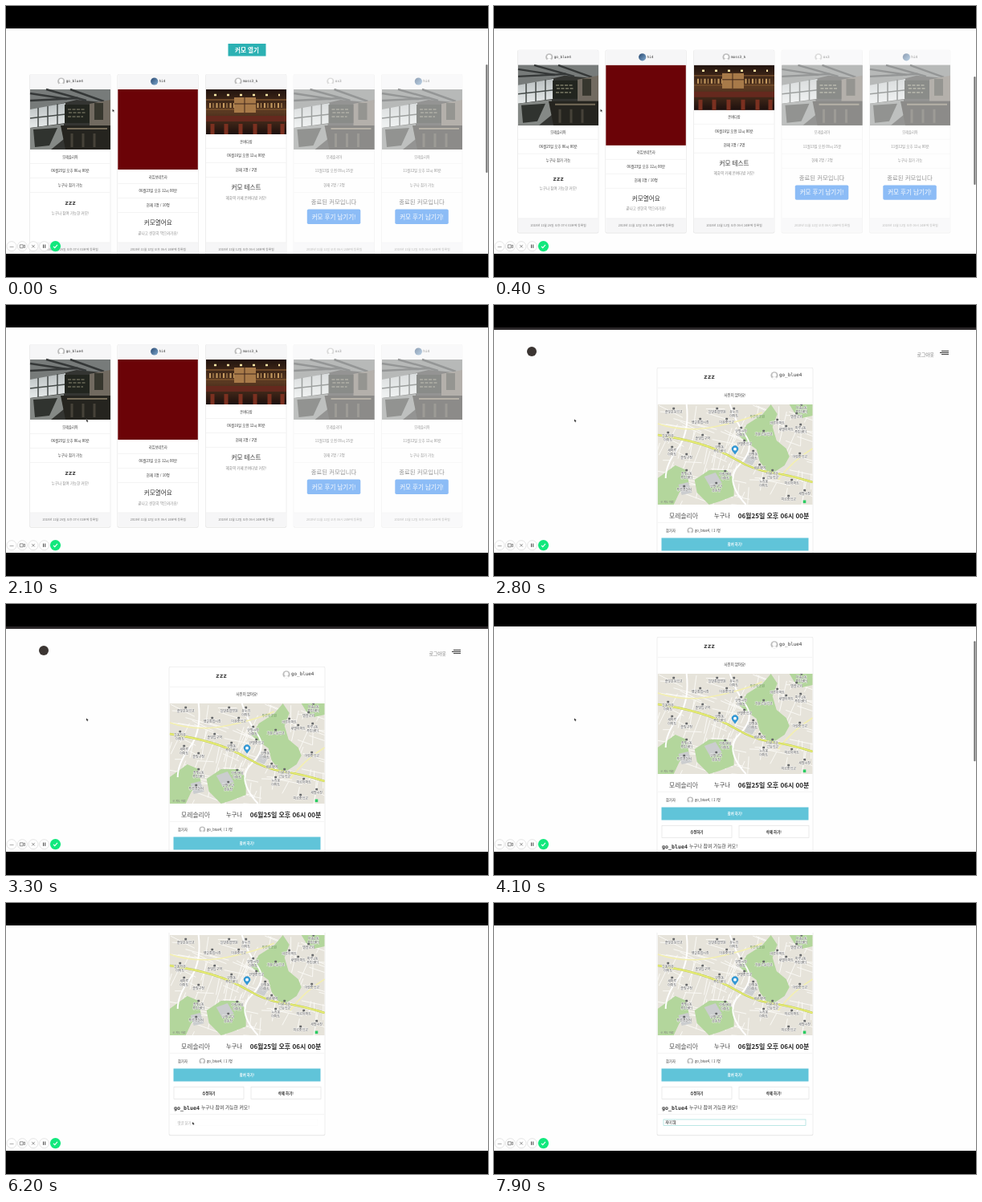
Write an HTML page that moves like this. It is 600 by 338 pixels and loops after 8 s.

```html
<!DOCTYPE html>
<html lang="ko">
<head>
<meta charset="utf-8">
<title>커모</title>
<style>
html, body { margin: 0; width: 100%; height: 100%; overflow: hidden; background: #000; }
svg { display: block; width: 100vw; height: 100vh; }
text { font-family: "Noto Sans CJK KR", "Noto Sans CJK", "Noto Sans", sans-serif; white-space: pre; }
.mono { font-family: "DejaVu Sans Mono", "Noto Sans CJK KR", monospace; }
</style>
</head>
<body>
<svg id="stage" viewBox="0 0 600 338">
  <defs>
    <clipPath id="view"><rect y="37" width="600" height="272"/></clipPath>
    <clipPath id="mapBox"><rect width="193" height="125"/></clipPath>
    <clipPath id="disc"><circle r="4.6"/></clipPath>
    <linearGradient id="glow" x2="0" y2="1">
      <stop offset="0" stop-color="#b9bfc0"/><stop offset="1" stop-color="#e6eaea"/>
    </linearGradient>
    <linearGradient id="sky" x2="1" y2="1">
      <stop offset="0" stop-color="#27476f"/><stop offset="1" stop-color="#7fa9cf"/>
    </linearGradient>
    <linearGradient id="bar" x2="0" y2="1">
      <stop offset="0" stop-color="#21130e"/><stop offset=".5" stop-color="#5b3a22"/><stop offset="1" stop-color="#1d0f0d"/>
    </linearGradient>
    <g id="person">
      <circle r="4.6" fill="#bdbdbd"/>
      <g clip-path="url(#disc)" fill="#fff"><circle cy="-.6" r="2.6"/><ellipse cy="5" rx="3.8" ry="2.8"/></g>
    </g>
    <circle id="photo" r="4.6" fill="url(#sky)"/>
    <g id="cafe">
      <rect width="100" height="75" fill="#343532"/>
      <path d="M0 0H100V17L58 13L0 27Z" fill="#777b7a"/>
      <path d="M0 5L46 12M0 14L60 11M20 0L70 14M50 0L92 15" stroke="#353838" stroke-width="2.4"/>
      <path d="M0 25L44 17V42L0 48Z" fill="url(#glow)"/>
      <path d="M10 23V48M22 21V46M34 18V45M0 36L44 31" stroke="#454b49" stroke-width="1.5"/>
      <path d="M74 18L100 13V45H74Z" fill="#716a60"/>
      <rect x="43" y="19" width="31" height="23" fill="#22251f"/>
      <path d="M47 25H68M48 29H70M47 34H66" stroke="#8b8a74" stroke-width="1.2" stroke-dasharray="4 1.5"/>
      <rect x="80" y="17" width="11" height="21" fill="#37372e"/>
      <path d="M0 48L42 43V62L26 75H0Z" fill="#858986"/>
      <path d="M4 50L34 48L24 70L6 72Z" fill="#30332f"/>
      <path d="M38 45H100V75H44Z" fill="#25241f"/>
      <path d="M46 49H96" stroke="#766c59" stroke-width="2"/>
      <path d="M52 55V72M66 55V72M80 55V72" stroke="#464239" stroke-width="3"/>
    </g>
    <g id="pub">
      <rect width="100" height="56" fill="url(#bar)"/>
      <path d="M0 13H100M0 25H100" stroke="#7d542e" stroke-width="1.4"/>
      <path d="M4 20H96" stroke="#c69b60" stroke-width="6" stroke-dasharray="2 2.5 1 3"/>
      <path d="M10 7H92" stroke="#ffe6a5" stroke-width="2.5" stroke-dasharray="3 13"/>
      <path d="M35 10H62V29H35Z" fill="#a87a49"/>
      <path d="M48 10V29M35 18H62" stroke="#40271a"/>
      <path d="M0 33H100V40H0Z" fill="#65291e"/>
      <path d="M8 43V56M25 43V56M43 43V56M61 43V56M79 43V56M95 43V56" stroke="#7b3020" stroke-width="5"/>
    </g>
  </defs>
  <rect y="28" width="600" height="281" fill="#fefefe"/>
  <g clip-path="url(#view)"><g id="list"></g><g id="detail"></g></g>
  <rect id="edge" y="28" width="600" height="3" fill="#2b2729"/>
  <rect id="thumb" x="597.3" width="2.2" rx="1.1" fill="#757575"/>
  <g id="tools"></g>
  <path id="cursor" d="M0 0V3.6L.9 2.8L1.6 4.1L2.2 3.8L1.6 2.6H2.7Z" fill="#111" stroke="#fff" stroke-width=".25"/>
</svg>
<script>
const $ = id => document.getElementById(id);

function add(parent, tag, attrs = {}) {
  const node = document.createElementNS('http://www.w3.org/2000/svg', tag);
  for (const key in attrs) node.setAttribute(key, attrs[key]);
  return parent.appendChild(node);
}
const rect = (p, x, y, width, height, fill, more) => add(p, 'rect', { x, y, width, height, fill, ...more });
const use = (p, id, x, y, k = 1) => add(p, 'use', { href: '#' + id, transform: `translate(${x} ${y}) scale(${k})` });
const path = (p, d, stroke, width, more) =>
  add(p, 'path', { d, fill: 'none', stroke, 'stroke-width': width, ...more });
const rule = (p, x, y, w) => path(p, `M${x} ${y}h${w}`, '#ececec', .6);

// y is the middle of the line
function label(p, str, x, y, size, more = {}) {
  const node = add(p, 'text', {
    x, y: y + size * .36, 'font-size': size, fill: '#333', 'text-anchor': 'middle', ...more
  });
  node.textContent = str;
  return node;
}
const left = { 'text-anchor': 'start' };
const bold = { 'font-weight': 700 };
const mono = { class: 'mono' };

function panel(p, x, y, w, h) {
  rect(p, x - .8, y, w + 1.6, h + 1.2, '#e4e4e4', { rx: 2 });
  rect(p, x - .2, y + .4, w + .4, h - .2, '#fff', { rx: 1.6 });
}

const USER = 'go_blue4', CAFE = '모레솔리아';
const cards = [
  { x: 30, user: USER, face: 'person', pic: 'cafe', h: 75, cafe: CAFE, date: '06월25일 오후 06시 00분',
    who: '누구나 참가 가능', title: 'zzz', note: '누구나 참여 가능한 커모!', made: '2018년 11월 26일 오후 07시 01분에 등록됨' },
  { x: 139.3, user: 'hi4', face: 'photo', h: 100, cafe: '라임보네트라', date: '06월23일 오후 12시 00분',
    who: '현재 1명 / 10명', title: '커모열어요', note: '끝나고 션한히 먹으러가요!', made: '2018년 11월 12일 오후 06시 24분에 등록됨' },
  { x: 249, user: 'moss3_k', face: 'person', pic: 'pub', h: 56, cafe: '온벼다방', date: '06월16일 오전 12시 00분',
    who: '현재 1명 / 2명', title: '커모 테스트', note: '혜화역 카페 온벼다방 커모!', made: '2018년 11월 12일 오후 06시 24분에 등록됨' },
  { x: 358.5, user: 'ox3', face: 'person', pic: 'cafe', h: 75, cafe: CAFE, date: '11월13일 오전 09시 25분',
    who: '현재 2명 / 2명', closed: true, made: '2018년 11월 12일 오후 06시 24분에 등록됨' },
  { x: 468, user: 'hi4', face: 'photo', pic: 'cafe', h: 75, cafe: CAFE, date: '11월12일 오후 12시 00분',
    who: '누구나 참가 가능', closed: true, made: '2018년 11월 12일 오후 06시 24분에 등록됨' }
];

function drawCard(p, c) {
  const g = add(p, 'g', { opacity: c.closed ? .52 : 1 });
  const mid = c.x + 50, base = 104 + c.h;
  panel(g, c.x, 85, 99.5, 227.5);
  rect(g, c.x, 85.5, 99.5, 18.5, '#f6f6f7');
  rect(g, c.x, 295, 99.5, 17, '#f6f6f7');
  const half = (c.user.length * 2.65 + 10.5) / 2;
  use(g, c.face, mid - half + 4.6, 94);
  label(g, c.user, mid - half + 10.5, 93.8, 4.4, { ...left, ...mono });
  if (c.pic) use(g, c.pic, c.x, 104);
  else rect(g, c.x, 104, 99.5, c.h, '#6b0307');
  label(g, c.cafe, mid, base + 9, 4.2);
  label(g, c.date, mid, base + 26.5, 4.4);
  label(g, c.who, mid, base + 44, 4.4);
  for (const dy of [17.5, 35.5, 53.5]) rule(g, c.x, base + dy, 99.5);
  if (c.closed) {
    label(g, '종료된 커모입니다', mid - .5, 244.3, 7.4);
    rect(g, c.x + 16.3, 253.6, 66.5, 18.4, '#2580ef', { rx: 1.8 });
    label(g, '커모 후기 남기기!', mid - .4, 262.8, 7.5, { fill: '#fff', 'font-weight': 500 });
  } else {
    const z = c.title === 'zzz';
    label(g, c.title, mid, base + 66, 7.6, z ? { ...mono, ...bold } : { 'font-weight': 500 });
    label(g, c.note, mid, base + 79, 4.5, { fill: '#888' });
  }
  rule(g, c.x, 295, 99.5);
  label(g, c.made, mid, 304, 3.75, { fill: '#777' });
}

function drawList(p) {
  rect(p, 276.5, 47, 47, 15.5, '#2cb1b3');
  label(p, '커모 열기', 300, 54.8, 7.6, { fill: '#fff', ...bold });
  for (const c of cards) drawCard(p, c);
}

const places = [
  [20, 10, '솔빛초등학교'], [13, 40, '늘봄타운|아파트'], [18, 58, '새마루|아파트'], [36, 67, '솔빛구청'],
  [74, 10, '늘벗종합병원'], [53, 23, '햇살종합시장'], [86, 23, '다온중학교'], [95, 10, '온누리|아파트'],
  [149, 24, '바른아파트'], [179, 5, '다솜1동|주민센터'], [173, 16, '별솔교회'], [56, 43, '솔빛입구역'],
  [108, 50, '한별중학교'], [104, 34, '한별시장|아파트'], [77, 54, '한별동|주민센터'], [132, 38, '가온고등학교'],
  [160, 32, '새별아파트'], [178, 30, '마루2동|주민센터'], [177, 66, '아람중학교'], [119, 63, '한별동|아파트'],
  [127, 80, '새온대역'], [143, 87, '다온기술|고등학교'], [167, 99, '미르아파트'], [132, 97, '누리봉|아파트'],
  [84, 88, '가람현대|아파트'], [36, 87, '솔빛1동|주민센터'], [33, 107, '푸른경찰서'], [73, 103, '한별구민|운동장'],
  [163, 119, '미르중학교'], [183, 112, '새별시장']
];

function drawMap(p) {
  const g = add(p, 'g', { transform: 'translate(203.7 124)', 'clip-path': 'url(#mapBox)' });
  rect(g, 0, 0, 193, 125, '#e6e3da');
  let seed = 11;
  const rnd = () => (seed = seed * 16807 % 2147483647) / 2147483647;
  let streets = '';
  for (let i = 0; i < 130; i++) {
    const a = .25 + (i % 2) * 1.57 + (rnd() - .5) * .5, n = 10 + rnd() * 30;
    streets += `M${(rnd() * 193).toFixed(1)} ${(rnd() * 125).toFixed(1)}l${(Math.cos(a) * n).toFixed(1)} ${(Math.sin(a) * n).toFixed(1)}`;
  }
  path(g, streets, '#faf9f5', 1);
  const parks = [
    'M141 0L130 13L111 25L102 40L112 48L123 56L127 71L140 88L158 76L164 65L160 55L148 45L143 28L149 12Z',
    'M164 0H193V14L180 17L170 10Z',
    'M0 92L22 76L36 82L39 99L27 110L20 125H0Z',
    'M46 94L64 82L86 82L95 93L95 114L77 121L64 125L49 110Z'
  ];
  for (const d of parks) add(g, 'path', { d, fill: '#b3d69c' });
  for (const d of ['M58 90l14 -5l8 13l-14 6Z', 'M26 100l12 -3l5 13l-13 3Z', 'M112 63l11 4l-5 9l-10 -4Z'])
    add(g, 'path', { d, fill: '#cbcdcf' });
  path(g, 'M90 0Q96 20 109 38T102 75T110 125M36 0Q40 35 25 55T10 92', '#fff', 2);
  path(g, 'M0 24Q35 36 75 27T130 10M150 94Q168 70 193 55', '#f3efb0', 1.5);
  const main = 'M0 38Q28 42 52 49T98 69T142 85T193 97';
  path(g, main, '#b8c945', 2.6);
  path(g, main, '#edf07a', 1.4);
  for (const [x, y, str] of places) {
    const lines = str.split('|');
    rect(g, x - 1.4, y - 6.2, 2.8, 2.8, '#66686a', { rx: .6 });
    lines.forEach((s, i) => label(g, s, x, y + i * 4.4, 4, {
      fill: '#4a4a4a', stroke: '#fff', 'stroke-width': .7, 'paint-order': 'stroke'
    }));
  }
  label(g, '푸른숲공원', 124, 16, 4, { fill: '#6d9560' });
  add(g, 'path', { d: 'M96.3 62.5L92.9 58A4.2 4.2 0 1 1 99.7 58Z', fill: '#3298d4' });
  add(g, 'circle', { cx: 96.3, cy: 55.7, r: 1.9, fill: '#fff' });
  label(g, '© 지도 자료', 12, 121.5, 3.2, { fill: '#777' });
  rect(g, 181, 119.5, 3.6, 3.6, '#2bcb62');
}

let hint, field, typed, caret;
function drawDetail(p) {
  add(p, 'circle', { cx: 47, cy: 58, r: 6, fill: '#3b3532' });
  label(p, '로그아웃', 537.3, 61.8, 5.8, { fill: '#777' });
  path(p, 'M557 57.4h9M555 59.5h11M557 61.6h9', '#333', 1);
  panel(p, 203.5, 78, 193, 295);
  label(p, 'zzz', 268, 88.8, 7.75, { ...mono, ...bold });
  use(p, 'person', 349, 87.8);
  label(p, USER, 355, 87.3, 5.9, { ...left, ...mono });
  rule(p, 204, 103.5, 192);
  label(p, '사진이 없어요!', 300, 112.3, 4.4);
  drawMap(p);
  label(p, CAFE, 236, 263, 7.8, { fill: '#555' });
  label(p, '누구나', 284, 262.6, 7.2);
  label(p, '06월25일 오후 06시 00분', 348, 262.8, 8, { ...bold, fill: '#222' });
  rule(p, 204, 271.3, 192);
  label(p, '참가자', 214, 281.3, 4.3, left);
  use(p, 'person', 244.3, 281.3, .83);
  label(p, USER + ', ( 1 )명', 250, 281.3, 4.2, left);
  rect(p, 208.5, 290.5, 183, 16, '#60c4d9');
  label(p, '참여 하기!', 300, 298.5, 4.3, { fill: '#fff', ...bold });
  for (const [x, str] of [[209, '수정하기'], [305, '삭제 하기!']]) {
    rect(p, x, 313.5, 87, 15, '#fff', { stroke: '#e2e2e2', 'stroke-width': .7 });
    label(p, str, x + 43.3, 321, 4.4, { ...bold, fill: '#222' });
  }
  label(p, USER, 209, 339.2, 6.65, { ...left, ...mono, ...bold });
  label(p, '누구나 참여 가능한 커모!', 243, 339, 5.8, left);
  rule(p, 204, 347.5, 192);
  field = rect(p, 211, 354, 177, 7.5, '#fff', { 'stroke-width': .6 });
  hint = label(p, '댓글 달기 ...', 213.5, 358, 4.3, { ...left, fill: '#aaa' });
  typed = label(p, '', 213.3, 357.8, 4.4, left);
  caret = rect(p, 0, 355.2, .6, 5.2, '#222');
}

function drawTools(p) {
  for (const cx of [7, 20.3, 34, 47.6])
    add(p, 'circle', { cx, cy: 299.7, r: 6, fill: '#fff', stroke: '#dedede', 'stroke-width': .8 });
  path(p, 'M4.6 300.5h5', '#999', .8);
  path(p, 'M17.3 297.8h4v4h-4ZM21.3 299.3l2.2 -1.3v3.6l-2.2 -1.3', '#666', .7);
  path(p, 'M32.2 297.9l3.6 3.6m0 -3.6l-3.6 3.6', '#777', .8);
  path(p, 'M46.5 297.5v4.4m2.2 -4.4v4.4', '#444', 1);
  add(p, 'circle', { cx: 61.5, cy: 299.6, r: 6.6, fill: '#12e87d' });
  path(p, 'M59 299.9l1.7 1.7l3.3 -3.8', '#fff', 1.1);
}

drawList($('list'));
drawDetail($('detail'));
drawTools($('tools'));

const clamp = v => Math.max(0, Math.min(1, v));
// keys: [time, value] pairs in order
function track(t, keys) {
  let [t0, v0] = keys[0];
  for (const [t1, v1] of keys) {
    if (t < t1) return v0 + (v1 - v0) * clamp((t - t0) / (t1 - t0));
    [t0, v0] = [t1, v1];
  }
  return v0;
}
const move = (node, x, y) => node.setAttribute('transform', `translate(${x} ${y})`);
const show = (node, on) => node.setAttribute('opacity', +on);

const OPEN = 2700, FOCUS = 6300;
const strokes = [[6600, 'ㅈ'], [6800, '재'], [7000, '재ㅁ'], [7200, '재미'], [7400, '재미ㅇ'], [7600, '재미이'], [7800, '재미있']];

function draw(t) {
  const open = t >= OPEN, focus = t >= FOCUS;
  const scroll = open
    ? track(t, [[3600, 0], [4100, 37], [4700, 83], [5400, 83], [5500, 84]])
    : 36 * (1 - Math.exp(-t / 220));
  show($('list'), !open);
  show($('detail'), open);
  move(open ? $('detail') : $('list'), 0, -scroll.toFixed(2));
  show($('edge'), open && t < 3600);

  const thumb = $('thumb');
  thumb.setAttribute('y', open ? 27 + scroll * .52 : 73 + scroll * .5);
  thumb.setAttribute('height', open ? 150 : 135);
  show(thumb, open
    ? track(t, [[3600, 0], [3700, 1], [5400, 1], [5800, 0]])
    : track(t, [[1000, 1], [1400, 0]]));

  const steps = strokes.filter(s => s[0] <= t);
  const str = steps.length ? steps[steps.length - 1][1] : '';
  typed.textContent = str;
  show(hint, !str);
  field.setAttribute('stroke', focus ? '#8fd8d4' : '#fafafa');
  caret.setAttribute('x', 213.3 + str.length * 4.4 * .92);
  show(caret, focus);

  move($('cursor'),
    track(t, [[1000, 132.5], [1700, 100], [5600, 100], [6200, 232]]),
    track(t, [[1000, 128.5], [1700, 142.3], [5600, 142.3], [6200, 273]]));
  show($('cursor'), !focus);
}

function frame(now) {
  draw(Math.floor(now % 8000 / 100) * 100);
  requestAnimationFrame(frame);
}
draw(0);
requestAnimationFrame(frame);
</script>
</body>
</html>
```
